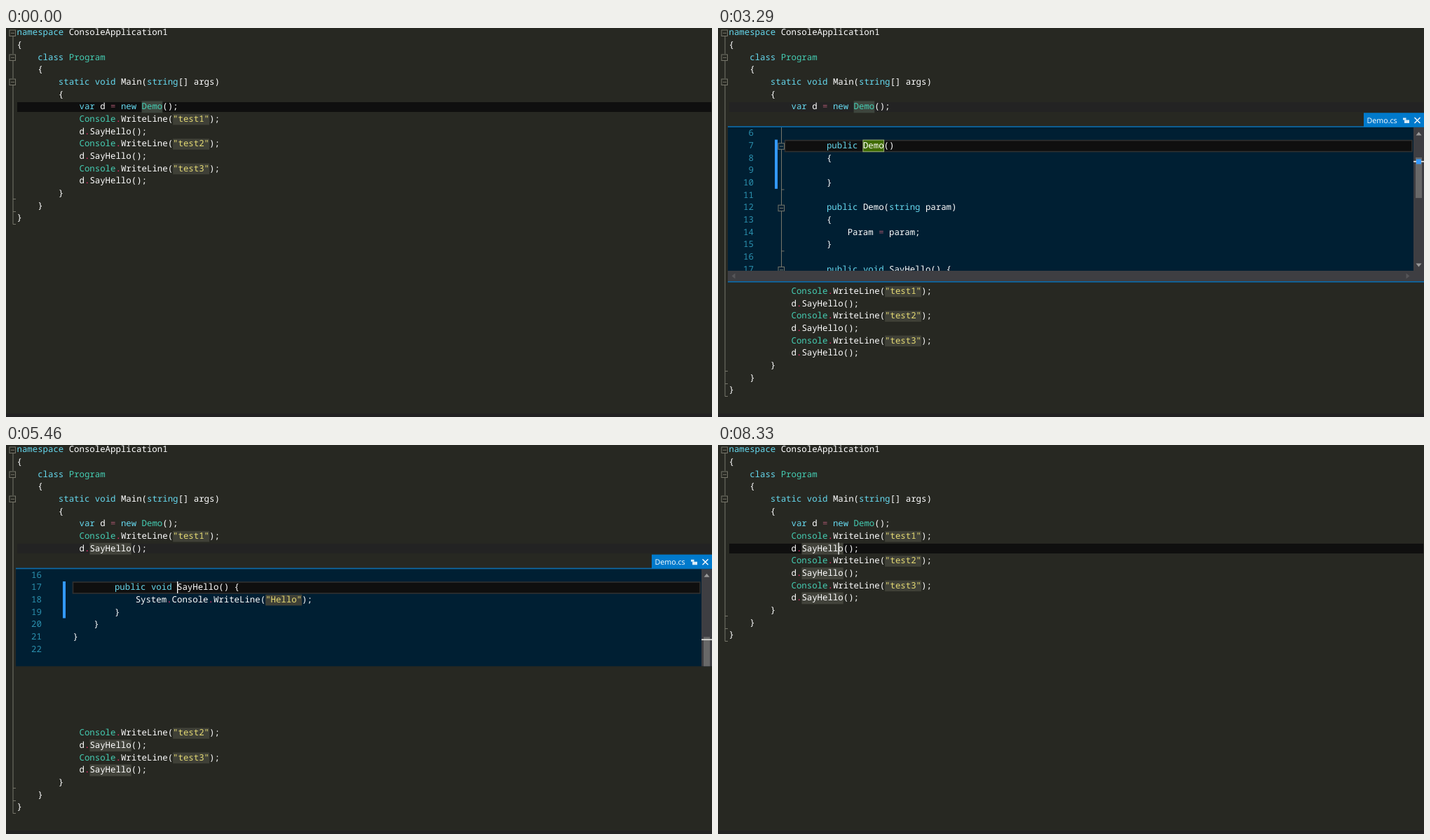
An HTML page that plays this animation: 1007x556 px, repeating every 8470 ms.

```html
<!DOCTYPE html>
<html lang="en">
<head>
<meta charset="utf-8">
<title>Peek definition</title>
<style>
html, body { margin: 0; width: 100%; height: 100%; overflow: hidden; background: #272822; }
svg { display: block; }
text { font: 500 12.367px "Noto Sans Mono", "DejaVu Sans Mono", monospace; text-rendering: geometricPrecision; }
.tab { font: 10.7px "Open Sans", "Noto Sans", sans-serif; }
</style>
</head>
<body>
<svg id="stage" width="1007" height="556" viewBox="0 0 1007 556"></svg>
<script>
const LOOP = 8470, CW = 7.42, LH = 17.67, TOP = -2, BASE = 12.2;
const LEFT = 15.5, PEEK_LEFT = 95.6, GAP = 246, PEEK_H = 222;
const WHITE = '#ffffff', CYAN = '#66d9ef', TEAL = '#45ceb4', PINK = '#ff2f74', MARK = '#42433b';
const OUTLINE = '#77766a';

const stage = document.getElementById('stage');

function add(parent, tag, attrs = {}, text) {
  const el = document.createElementNS('http://www.w3.org/2000/svg', tag);
  for (const k in attrs) el.setAttribute(k, attrs[k]);
  if (text !== undefined) el.textContent = text;
  return parent.appendChild(el);
}
const rect = (parent, x, y, width, height, fill, more) =>
  add(parent, 'rect', { x, y, width, height, fill, ...more });
const path = (parent, d, stroke, width = 1) =>
  add(parent, 'path', { d, stroke, 'stroke-width': width, fill: 'none' });
const show = (el, on) => el.setAttribute('visibility', on ? 'inherit' : 'hidden');
const colX = (col, left = LEFT) => left + col * CW;
const rowY = row => TOP + row * LH;

const KEYWORDS = /^(namespace|class|static|void|string|var|new|public)$/;
function colorOf(token, types) {
  if (KEYWORDS.test(token)) return CYAN;
  if (types.includes(token)) return TEAL;
  if (token === '.') return PINK;
  if (token === '=') return '#a8576e';
  if (token[0] === '"') return '#e6db74';
  return WHITE;
}

// One line of highlighted code; strings get a soft backdrop
function codeLine(parent, src, left, y, types) {
  const line = add(parent, 'text', { y: y + BASE });
  const spans = {};
  for (const m of src.matchAll(/"[^"]*"|\w+|[.=]|[^\s\w".=]+/g)) {
    const x = colX(m.index, left);
    if (m[0][0] === '"') {
      parent.insertBefore(rect(parent, x, y + 1.2, m[0].length * CW, 15.6, '#3f4037'), line);
    }
    spans[m[0]] = add(line, 'tspan', { x, fill: colorOf(m[0], types) }, m[0]);
  }
  return spans;
}

function foldBox(parent, x, y) {
  rect(parent, x - 4, y - 4, 8.5, 8.5, 'none', { stroke: OUTLINE });
  path(parent, `M${x - 2} ${y + .3}h5`, OUTLINE);
}

// Main editor
const mainCode = `namespace ConsoleApplication1
{
    class Program
    {
        static void Main(string[] args)
        {
            var d = new Demo();
            Console.WriteLine("test1");
            d.SayHello();
            Console.WriteLine("test2");
            d.SayHello();
            Console.WriteLine("test3");
            d.SayHello();
        }
    }
}`.split('\n');

rect(stage, 0, 0, 1007, 556, '#272822');
rect(stage, 0, 551, 1007, 5, '#222222');
const current = rect(stage, 16, 0, 990, 14, '#0f0f0f');
const demoMark = rect(stage, colX(24), rowY(6) + .3, 4 * CW, 17, '#3d453d');
const helloMarks = [];
const rows = mainCode.map((src, i) => {
  const g = add(stage, 'g');
  if (src.includes('SayHello')) helloMarks.push(rect(g, colX(14), rowY(i) + .5, 8 * CW, 16.8, MARK));
  codeLine(g, src, LEFT, rowY(i), ['Console', 'Program', 'Demo']);
  return g;
});
[7, 42, 77].forEach(y => foldBox(stage, 9, y));
const fold = path(stage, '', OUTLINE);
const caret = rect(stage, 0, 0, 1.3, 17, WHITE);

// Peek views
function arrow(parent, x, y, dx, dy, fill) {
  const d = dx ? `M${x - 2.5 * dx} ${y - 4}v8l${5 * dx} -4z` : `M${x - 4} ${y - 2.5 * dy}h8l-4 ${5 * dy}z`;
  add(parent, 'path', { d, fill });
}

function makePeek(o) {
  const y0 = rowY(o.row + 2) + 2.6;
  const lineY = n => y0 + (n - o.first) * LH;
  const g = add(stage, 'g');
  const clipId = 'clip' + o.row;
  const clip = rect(add(g, 'clipPath', { id: clipId }), 0, y0, 1007, 0, '#fff');
  const body = add(g, 'g', { 'clip-path': `url(#${clipId})` });

  rect(body, 14, y0, 993, 206, '#001f33');
  const cy = lineY(o.target);
  rect(body, 95.5, cy + 1, 894.5, 16, '#0f0f0f', { stroke: '#303030', 'stroke-width': 1.6 });
  rect(body, 81, lineY(o.changed[0]), 4, (o.changed[1] - o.changed[0] + 1) * LH - .5, '#3399ff');

  const settled = add(body, 'g');
  const nameX = colX(o.name[0], PEEK_LEFT);
  rect(settled, nameX, cy + .5, o.name[1] * CW, 16.6, '#3f6b00', { stroke: '#9db57a' });
  path(settled, o.folds(lineY), OUTLINE);
  o.boxes.forEach(n => foldBox(settled, 90, lineY(n) + 9.2));

  let consoleSpan;
  o.code.split('\n').forEach((src, i) => {
    const y = y0 + i * LH;
    add(body, 'text', { x: 50.9, y: y + BASE, 'text-anchor': 'end', fill: '#2b91af' }, o.first + i);
    consoleSpan = codeLine(body, src, PEEK_LEFT, y, []).Console || consoleSpan;
  });
  const blink = rect(body, nameX, cy, 1.3, 17, WHITE);

  rect(body, 992, y0, 15, 206, '#3e3e42');
  rect(body, 995, y0 + o.thumb, 9, 58, '#686868');
  arrow(body, 999.5, y0 + 9, 0, -1, '#999999');
  arrow(body, 999.5, y0 + 197, 0, 1, '#999999');
  rect(body, 992, y0 + o.mark - 1, 15, 1.8, '#dcdcd8');
  const dot = rect(body, 996, y0 + o.mark - 3.5, 7, 7, '#3399ff');
  rect(body, 14, y0 + 205, 993, 15.5, '#3e3e42');
  arrow(body, 22, y0 + 212.5, -1, 0, '#555558');
  arrow(body, 984, y0 + 212.5, 1, 0, '#555558');
  rect(body, 14, y0 + 220, 993, 1.6, '#0a6cae');

  rect(g, 14, y0 - 1.6, 993, 1.6, '#0a6cae');
  rect(g, 921, y0 - 20.7, 86, 20, '#007acc');
  add(g, 'text', { class: 'tab', x: 925.5, y: y0 - 6.2, fill: '#fff' }, 'Demo.cs');
  rect(g, 977, y0 - 13.5, 4.5, 3, '#d9ecf8');
  rect(g, 979, y0 - 10.5, 7, 4.5, '#d9ecf8');
  path(g, `M993.5 ${y0 - 14}l8 8m0 -8l-8 8`, '#fff', 1.4);

  return t => {
    const open = t >= o.open && t < o.close;
    show(g, open);
    if (!open) return 0;
    const step = Math.floor((t - o.grow) / 70);
    const done = step >= 3;
    clip.setAttribute('height', step < 0 ? 0 : step < 1 ? 3.5 : step < 2 ? 139 : PEEK_H);
    show(settled, done);
    show(dot, done);
    if (consoleSpan) consoleSpan.setAttribute('fill', done ? TEAL : WHITE);
    const flips = o.blinks.filter(b => t >= b).length;
    show(blink, flips % 2 === 0);
    return GAP;
  };
}

const peeks = [
  {
    row: 6, first: 6, target: 7, name: [15, 4], changed: [7, 10],
    open: 1820, grow: 1890, close: 3430, blinks: [2380, 2870, 3290],
    thumb: 43, mark: 49, boxes: [7, 12, 17],
    folds: y => `M90.5 ${y(6)}V${y(7) + 5}M90.5 ${y(7) + 14}V${y(12) + 5}M90.5 ${y(12) + 14}V${y(17) + 5}` +
      `M90.5 ${y(11) + .7}h4M90.5 ${y(16) + .2}h4`,
    code: `
        public Demo()
        {

        }

        public Demo(string param)
        {
            Param = param;
        }

        public void SayHello() {`
  },
  {
    row: 8, first: 16, target: 17, name: [20, 8], changed: [17, 19],
    open: 5320, grow: 5390, close: 7420, blinks: [5880, 6370, 6860, 7280],
    thumb: 97, mark: 101, boxes: [17],
    folds: y => `M90.5 ${y(16) + 1}V${y(17) + 5}M90.5 ${y(17) + 14}V${y(22)}` +
      [20, 21, 22].map(n => `M90.5 ${y(n)}h4`).join(''),
    code: `
        public void SayHello() {
            System.Console.WriteLine("Hello");
        }
    }
}
`
  }
].map(o => ({ row: o.row, update: makePeek(o) }));

// [time, row, column, visible]
const caretSteps = [
  [0, 6, 23, 0], [280, 6, 23, 1], [630, 6, 24, 1], [770, 6, 25, 1], [1190, 6, 25, 0], [1680, 6, 25, 1],
  [3780, 7, 25, 1], [3920, 8, 25, 1], [4200, 8, 24, 1], [4340, 8, 23, 1], [4410, 8, 22, 1], [4480, 8, 21, 1],
  [7910, 8, 21, 0], [8330, 8, 21, 1]
];

function draw(t) {
  let gap = 0, splitRow = 99;
  for (const p of peeks) {
    const size = p.update(t);
    if (size) { gap = size; splitRow = p.row; }
  }
  rows.forEach((g, i) => g.setAttribute('transform', `translate(0 ${i > splitRow ? gap : 0})`));

  const ends = [14, 15, 16].map(r => Math.round(rowY(r) + gap) - .5);
  fold.setAttribute('d', 'M10 12V37M10 47V72M10 82V' + ends[2] + ends.map(y => `M10 ${y}h4`).join(''));

  const [, row, col, on] = caretSteps.filter(s => s[0] <= t).pop();
  caret.setAttribute('x', colX(col) + .1);
  caret.setAttribute('y', rowY(row) + .2);
  show(caret, on && !gap);
  current.setAttribute('y', Math.round(rowY(row) + 2));
  current.setAttribute('fill', gap ? '#232323' : '#0f0f0f');
  show(demoMark, t < 4060);
  helloMarks.forEach(m => show(m, t >= 4830));
}

function tick() {
  draw(performance.now() % LOOP);
  requestAnimationFrame(tick);
}
tick();
</script>
</body>
</html>
```
